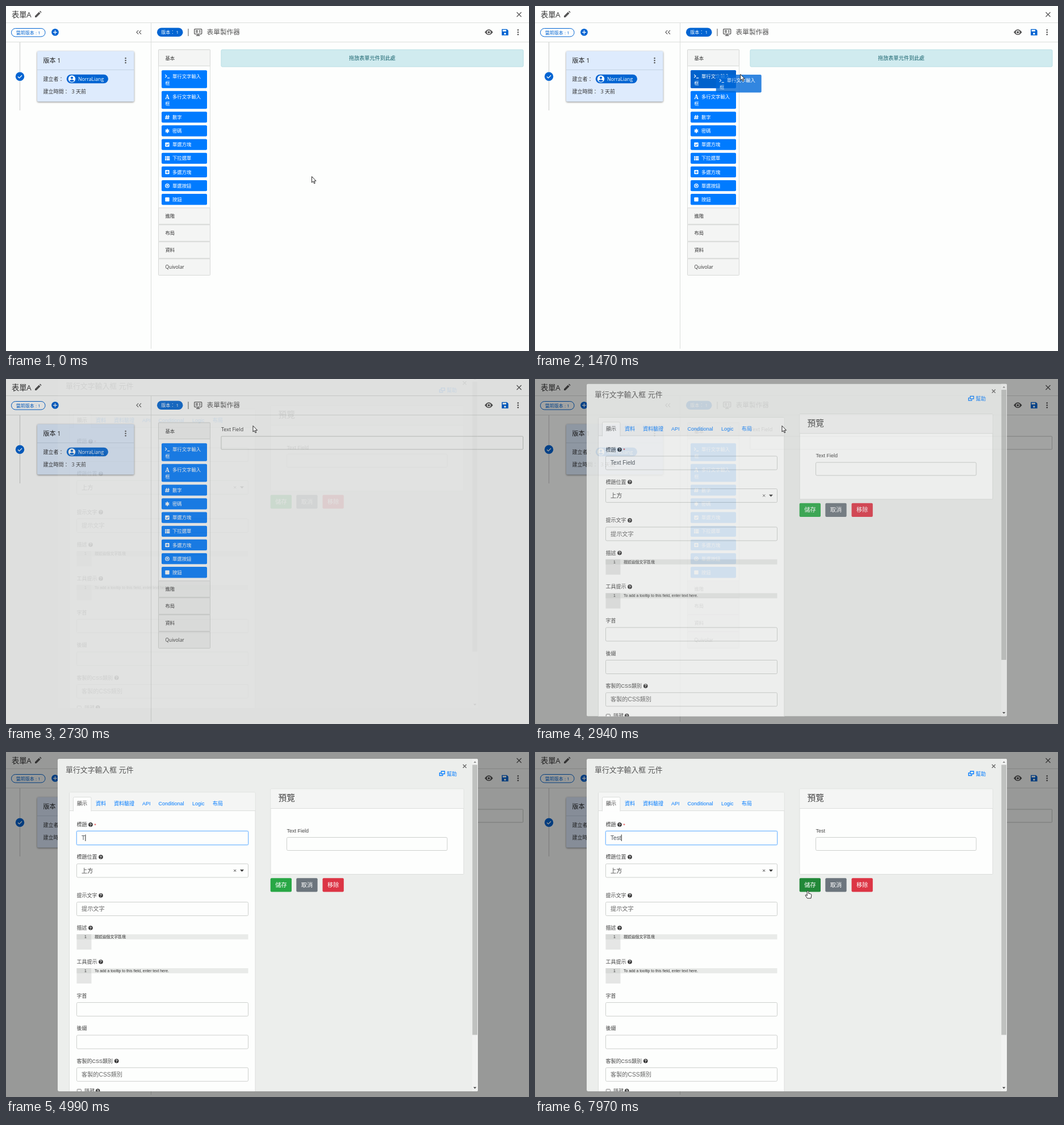
Write an HTML page that moves like this. It is 921x608 px and loops after 8 s.

```html
<!DOCTYPE html>
<html lang="zh-Hant">
<head>
<meta charset="utf-8">
<style>
html, body { margin: 0; height: 100%; overflow: hidden; background: #fdfefd; }
svg { display: block; width: 921px; height: 608px; }
text { font-family: "Open Sans", "Noto Sans CJK TC", "Noto Sans CJK", sans-serif; white-space: pre; }
#dialog text { font-family: "Liberation Sans", "Noto Sans CJK TC", "Noto Sans CJK", sans-serif; }
#card { filter: drop-shadow(0 1px 1.5px #0007); }
</style>
</head>
<body>
<svg id="stage" viewBox="0 0 921 608"></svg>
<script>
const BLUE = '#0064d2', BTN = '#007bff', INK = '#333', GREY = '#555', PAPER = '#fdfefd', LINE = '#dcdedc', EDGE = '#cdd0cd';

const text = (x, y, size, str, fill = INK, more = '') =>
  `<text x="${x}" y="${y}" font-size="${size}" fill="${fill}" ${more}>${str}</text>`;
const rect = (x, y, w, h, fill, stroke = 'none', r = 0, more = '') =>
  `<rect x="${x}" y="${y}" width="${w}" height="${h}" fill="${fill}" stroke="${stroke}" rx="${r}" ${more}/>`;
const path = (d, stroke, width = 1, fill = 'none') =>
  `<path d="${d}" stroke="${stroke}" stroke-width="${width}" fill="${fill}"/>`;
const circle = (x, y, r, fill, more = '') => `<circle cx="${x}" cy="${y}" r="${r}" fill="${fill}" ${more}/>`;
const dots = (x, y, gap) => [-gap, 0, gap].map(d => circle(x, y + d, 1.3, GREY)).join('');
const MID = 'text-anchor="middle"', BOLD = 'font-weight="700"';

// Page header and version panel
const header = () =>
  text(10, 20, 13.2, '表單A') +
  path('M51 17.5l7-7 2.6 2.6-7 7H51ZM59 9.5l1.2-1.1 2.4 2.5-1.1 1.2Z', 'none', 0, GREY) +
  path('M899.5 11l8 8M907.5 11l-8 8', GREY, 1.2) +
  path('M0 29.5H921M0 63.5H921M255.5 29V604', LINE) +
  rect(9.5, 39.5, 59.5, 14.5, 'none', BLUE, 7.2) +
  text(39.3, 49.6, 8, '當前版本 : 1', BLUE, MID) +
  circle(86.5, 46.3, 6.3, BLUE) + path('M83 46.3h7M86.5 42.8v7', '#fff', 1.3) +
  path('M233.2 42.8l-3.3 3.4 3.3 3.4M238 42.8l-3.3 3.4 3.3 3.4', GREY, 1.1) +
  rect(266, 38.5, 45.5, 15.5, BLUE, 'none', 7.7) +
  text(288.7, 49.4, 8, '版本： 1', '#fff', MID) +
  path('M321 40V53', GREY) +
  rect(331.7, 40.7, 13, 8.6, 'none', GREY, 1, 'stroke-width="1.3"') +
  path('M335 52h6.5M338.2 49v3M334 43.5h4M334 46h4M340 43.5h2.5M340 46h2.5', GREY, 1.3) +
  text(353.5, 50.3, 11.7, '表單製作器', GREY) +
  path('M843 46.2Q850.2 36.5 857.5 46.2Q850.2 56 843 46.2Z', 'none', 0, GREY) +
  circle(850.2, 46.2, 3.3, '#fff') + circle(850.2, 46.2, 2, GREY) +
  path('M873 40.7h9l2.6 2.6v8.5H873Z', 'none', 0, BLUE) +
  rect(874.5, 42, 6.5, 2.8, '#fff') + circle(878.8, 48.7, 1.8, '#fff') +
  dots(901.7, 46.2, 4);

const versions = () =>
  path('M24.5 64V184', '#cfd0cf', 1.2) +
  circle(24.5, 124.3, 7.7, BLUE) + path('M21 124.5l2.4 2.4 4.6-4.7', '#fff', 1.3) +
  rect(55, 79.5, 170.5, 89, '#deebfd', 'none', 2, 'id="card"') +
  path('M55 112.5H225.5', '#c4d2e3') +
  text(65.5, 99.5, 11, '版本 1', '#222') + dots(210.6, 96, 4) +
  text(65.5, 131.7, 9, '建立者：') +
  rect(106.7, 120.8, 73.3, 15.4, BLUE, 'none', 7.7) +
  circle(116, 128.5, 6.2, '#fff') + circle(116, 126.6, 2.1, BLUE) +
  path('M111.8 131.8Q116 127.8 120.2 131.8Q116 135.8 111.8 131.8Z', 'none', 0, BLUE) +
  text(127, 131.7, 8.7, 'NorraLiang', '#fff') +
  text(65.5, 154.2, 9, '建立時間：') + text(115.5, 154.2, 9, '3 天前');

// Palette icons, each drawn around its own centre
const white = 'none', tile = rect(-3.7, -3.7, 7.4, 7.4, '#fff', 'none', 1);
const icons = [
  path('M-3.7-3l2.6 2.6-2.6 2.6M0 3h4.2', '#fff', 1.2),
  text(0, 3.6, 10, 'A', '#fff', MID + ' style="font-family:Noto Serif,serif;font-weight:700"'),
  path('M-1-3.8l-1.3 7.6M2.3-3.8l-1.3 7.6M-3.5-1.4h7.6M-4 1.5h7.6', '#fff', 1.3),
  path('M0-3.8V3.8M-3.3-1.9l6.6 3.8M3.3-1.9l-6.6 3.8', '#fff', 1.9),
  tile + path('M-2 0l1.5 1.6 2.7-3', BTN, 1.2),
  path('M-4-2.6h2M-4 0h2M-4 2.6h2M-1.4-2.6h5.8M-1.4 0h5.8M-1.4 2.6h5.8', '#fff', 2),
  tile + path('M-2.4 0h4.8M0-2.4v4.8', BTN, 1.2),
  circle(0, 0, 3.2, 'none', 'stroke="#fff" stroke-width="1.3"') + circle(0, 0, 1.4, '#fff'),
  tile
];
const tool = (i, y, label, more = '') => {
  const tall = i < 2;
  return rect(274, y, 80, tall ? 31.5 : 19.3, BTN, 'none', 2, more) +
    `<g transform="translate(284 ${y + (tall ? 10.7 : 9.8)})">${icons[i]}</g>` +
    text(293, y + (tall ? 13.4 : 12.7), 8.4, label, '#fff') +
    (tall ? text(280.3, y + 25.4, 8.4, '框', '#fff') : '');
};
const firstTool = '單行文字輸入';
const tools = [firstTool, '多行文字輸入', '數字', '密碼', '單選方塊', '下拉選單', '多選方塊', '單選按鈕', '按鈕'];
const palette = () =>
  rect(268.5, 77, 91, 397, PAPER, LINE, 1) +
  ['基本', '進階', '布局', '資料', 'Quivolar'].map((label, i) => {
    const y = i ? 325.8 + i * 30 : 77;
    return rect(268.5, y, 91, 28.7, '#f4f5f4', '#d6d8d6', 1) + text(280.5, y + 17.6, 8.4, label);
  }).join('') +
  tools.map((label, i) => tool(i, i < 2 ? 113.2 + i * 36.6 : 186.2 + (i - 2) * 24.15, label)).join('') +
  `<g id="pressed" opacity="0">${tool(0, 113.2, firstTool).replace(BTN, '#0062cc')}</g>`;

const canvasArea = () =>
  `<g id="hint">${rect(379, 77, 532, 30, '#d0ebef', '#b9dfe5', 2)}${text(645, 95.2, 9.1, '拖放表單元件到此處', '#17626d', MID)}</g>` +
  `<g id="field">${text(379, 92, 9, 'Text Field')}${rect(379, 101, 531.5, 23, PAPER, '#c4c7c4', 1)}</g>` +
  `<g id="ghost" opacity=".8">${tool(0, 113.2, firstTool).replace(BTN, '#0069d9')}</g>`;

// Component dialog
const box = (y, str = '', fill = '#666', h = 24) =>
  rect(124.5, y, 302, h, PAPER, EDGE, 2) + text(133, y + 15.6, 10.2, str, fill);
const label = (y, str, help) => text(124.5, y, 9, str, '#444') +
  (help ? circle(help, y - 3.3, 3.8, INK) + text(help, y - .8, 7, '?', '#fff', MID + BOLD.padStart(18)) : '');
const editor = (y, str) =>
  rect(124.5, y, 26, 27, '#e5e6e5') + rect(124.5, y, 26, 9, '#d8dad8') + rect(150.5, y, 276, 9, '#e9ebe9') +
  text(140, y + 7, 6.85, '1', INK, MID) + text(156, y + 7, 6.85, str);
const button = (x, str, fill, id) =>
  rect(x, 222.3, 37.3, 24.3, fill, 'none', 2, `id="${id}"`) + text(x + 18.7, 237.8, 10.2, str, '#fff', MID);
const tabs = [[158, '資料'], [190, '資料驗證'], [240, 'API'], [268.5, 'Conditional'], [328, 'Logic'], [364, '布局']];

const dialog = () =>
  rect(91, 12, 740, 586, '#eceeec', 'none', 2) +
  text(105, 35.5, 12.9, '單行文字輸入框 元件', GREY) +
  path('M804.7 22l6 6M810.7 22l-6 6', '#666', 1.3) +
  path('M766.5 34h6v4.5h-6ZM769 39.5v2h-5.5v-4.5h2', BTN, 1.3) + text(776, 41.5, 9, '幫助', BTN) +
  rect(111.5, 71, 327.5, 540, PAPER, LINE, 2) + rect(112, 71.5, 326.5, 32, '#f4f5f4') +
  path('M112 103.5H439', LINE) +
  path('M118.5 104.5V81.5q0-2 2-2h27.500q2 0 2 2V104.5', LINE, 1, PAPER) +
  text(125, 94.3, 9, '顯示', '#444') + tabs.map(([x, s]) => text(x, 94.3, 9, s, BTN)).join('') +
  label(131.3, '標題', 149) + text(155.3, 131.8, 9, '*', '#d33') +
  rect(123.3, 138.300, 304.4, 26.4, '#bfdeff', 'none', 3, 'id="glow"') +
  rect(124.5, 139.5, 302, 24, PAPER, EDGE, 2, 'id="titleBox"') +
  rect(133, 145, 0, 12.5, '#2f7fe0', 'none', 0, 'id="selection"') +
  text(133, 155, 10.1, 'Text Field', '#495057', 'id="title"') +
  rect(0, 145.5, .9, 11.5, '#111', 'none', 0, 'id="caret"') +
  label(188.3, '標題位置', 167) + box(197, '上方', '#444') +
  path('M401.2 207l4 4M405.2 207l-4 4', GREY) + path('M412 207.3h7l-3.5 3.7Z', 'none', 0, INK) +
  label(256, '提示文字', 167) + box(264.5, '提示文字') +
  label(313.3, '描述', 149) + editor(321.3, '描述這個文字區塊') +
  label(373, '工具提示', 167) + editor(381, 'To add a tooltip to this field, enter text here.') +
  label(433, '字首') + box(441.5) +
  label(490.3, '後綴') + box(499) +
  label(547.8, '客製的CSS類別', 194.7) + box(556.3, '客製的CSS類別') +
  rect(125.3, 594.3, 7, 7, '#fff', '#777', 1) + text(138, 600.7, 9, '隱藏', '#444') + label(600.5, '', 161.7) +
  rect(466, 65, 340, 150.5, PAPER, LINE, 1) + rect(466.5, 65.5, 339, 33.5, '#f4f5f4') + path('M466 99.5H806', LINE) +
  text(479.5, 86.3, 14.7, '預覽', '#444') +
  text(494.5, 141.6, 9, 'Text Field', '#444', 'id="preview"') +
  rect(494.5, 150.5, 282.5, 23, PAPER, EDGE, 2) +
  button(465.7, '儲存', '#28a745', 'save') + button(511.3, '取消', '#6c757d', 'cancel') + button(557.5, '移除', '#dc3545', 'remove') +
  rect(821, 12, 10, 586, '#f1f2f1') + rect(821.3, 22.500, 8.7, 476, '#bfc1bf') +
  path('M823.5 19h4.6l-2.3-2.700Z', 'none', 0, '#888') + path('M823 590.500h5.400l-2.700 3Z', 'none', 0, '#444');

const pointers =
  `<g id="arrow">${path('M0 0V10.6L2.4 8.4 4.1 12.3 5.8 11.6 4.1 7.8H7.5Z', '#111', .9, '#fff')}</g>` +
  `<g id="beam">${path('M-2.2-5.3H-.6L0-4.8.6-5.3H2.2M0-5V5.500M-2.2 5.800H-.6L0 5.300.6 5.800H2.2', '#111', 1)}</g>` +
  `<g id="hand">${path('M-1.3 1Q0-.7 1.3 1V5L5 5.800Q6.500 6.200 6.300 8L5.500 13.500H-1L-4.400 8.600Q-4 6.800-2.600 7.600L-1.300 9Z', '#111', .9, '#fff')}</g>`;

const stage = document.getElementById('stage');
stage.innerHTML =
  '<clipPath id="sheet"><rect x="91" y="12" width="740" height="586" rx="2"/></clipPath>' +
  rect(0, 0, 921, 608, PAPER) + header() + versions() + palette() + canvasArea() +
  rect(0, 0, 921, 608, '#000', 'none', 0, 'id="shade"') +
  `<g id="dialog"><g clip-path="url(#sheet)">${dialog()}</g></g><g id="pointer">${pointers}</g>`;

const el = {};
stage.querySelectorAll('[id]').forEach(e => el[e.id] = e);
const set = (id, attrs) => { for (const k in attrs) el[id].setAttribute(k, attrs[k]); };
const show = (id, on) => set(id, { visibility: on ? 'inherit' : 'hidden' });

// Motion
const LOOP = 8000;
const clamp = (v, a = 0, b = 1) => Math.min(b, Math.max(a, v));
const ramp = (t, a, b) => clamp((t - a) / (b - a));

// CSS "ease": cubic-bezier(.25, .1, .25, 1)
function ease(x) {
  let lo = 0, hi = 1;
  for (let i = 0; i < 20; i++) {
    const u = (lo + hi) / 2, bx = .75 * u * (1 - u) + u ** 3;
    bx < x ? lo = u : hi = u;
  }
  return .3 * lo * (1 - lo) ** 2 + 3 * lo * lo * (1 - lo) + lo ** 3;
}

// Keys are [time, x, y], joined by straight moves
function along(keys, t) {
  let a = keys[0];
  for (const b of keys) {
    if (t < b[0]) {
      const p = ramp(t, a[0], b[0]);
      return [a[1] + (b[1] - a[1]) * p, a[2] + (b[2] - a[2]) * p];
    }
    a = b;
  }
  return [a[1], a[2]];
}
const mouse = [
  [80, 538.5, 300.5], [880, 317, 131], [1340, 317, 131], [1470, 361.5, 120.5], [1800, 435, 82.5],
  [3480, 435, 82.5], [3610, 248.5, 130], [3850, 180, 152], [4200, 127, 154],
  [5920, 127, 154], [6460, 567, 151.3], [6710, 521, 151.3],
  [7170, 521, 151.3], [7700, 487, 245], [7970, 480.5, 244.3]
];
const drag = [[1340, 0, 0], [1470, 44.5, 7.8], [1800, 118, -22]];
const DROP = 2100, FOCUS = 3850, TYPE = 4990;
const within = (x, y, l, t, r, b) => x >= l && x <= r && y >= t && y <= b;

function typed(t, first) {
  if (t < first) return 'Text Field';
  return 'Test'.slice(0, t < 5290 ? 1 : t < 5500 ? 2 : t < 5580 ? 3 : 4);
}

function draw(t) {
  const [x, y] = along(mouse, t), [gx, gy] = along(drag, t);
  set('pressed', { opacity: ramp(t, 890, 1050) - ramp(t, 2150, 2270) });
  show('ghost', t >= 1340 && t < DROP);
  set('ghost', { transform: `translate(${gx} ${gy})` });
  show('hint', t < DROP);
  show('field', t >= DROP);

  const open = ease(ramp(t, 2680, 3180));
  set('shade', { opacity: .4 * ease(ramp(t, 2630, 3130)) });
  set('dialog', { opacity: open, transform: `translate(0 ${-20 * (1 - open)})` });

  const focus = t >= FOCUS, selecting = focus && t < TYPE, left = clamp(x, 133, 177);
  show('glow', focus);
  set('titleBox', { stroke: focus ? '#80bdff' : EDGE });
  show('selection', selecting);
  set('selection', { x: left, width: 177 - left });
  el.title.textContent = typed(t, TYPE);
  set('title', { fill: selecting && left < 134 ? '#fff' : '#495057' });
  el.preview.textContent = typed(t, 5290);
  show('caret', t >= TYPE && Math.floor(Math.max(0, t - 5700) / 530) % 2 === 0);
  set('caret', { x: 133.3 + el.title.getComputedTextLength() });

  const inDialog = t > 3180;
  const onSave = inDialog && within(x, y, 466, 222, 503, 246.5);
  const onInput = inDialog && (within(x, y, 124, 139, 427, 164) || within(x, y, 494, 150, 777, 174));
  set('save', { fill: onSave ? '#218838' : '#28a745' });
  show('arrow', !onSave && !onInput);
  show('beam', onInput);
  show('hand', onSave);
  show('pointer', t < TYPE || t >= 5920);
  set('pointer', { transform: `translate(${x} ${y})` });
}

const start = performance.now();
function tick() {
  draw((performance.now() - start) % LOOP);
  requestAnimationFrame(tick);
}
tick();
</script>
</body>
</html>
```
